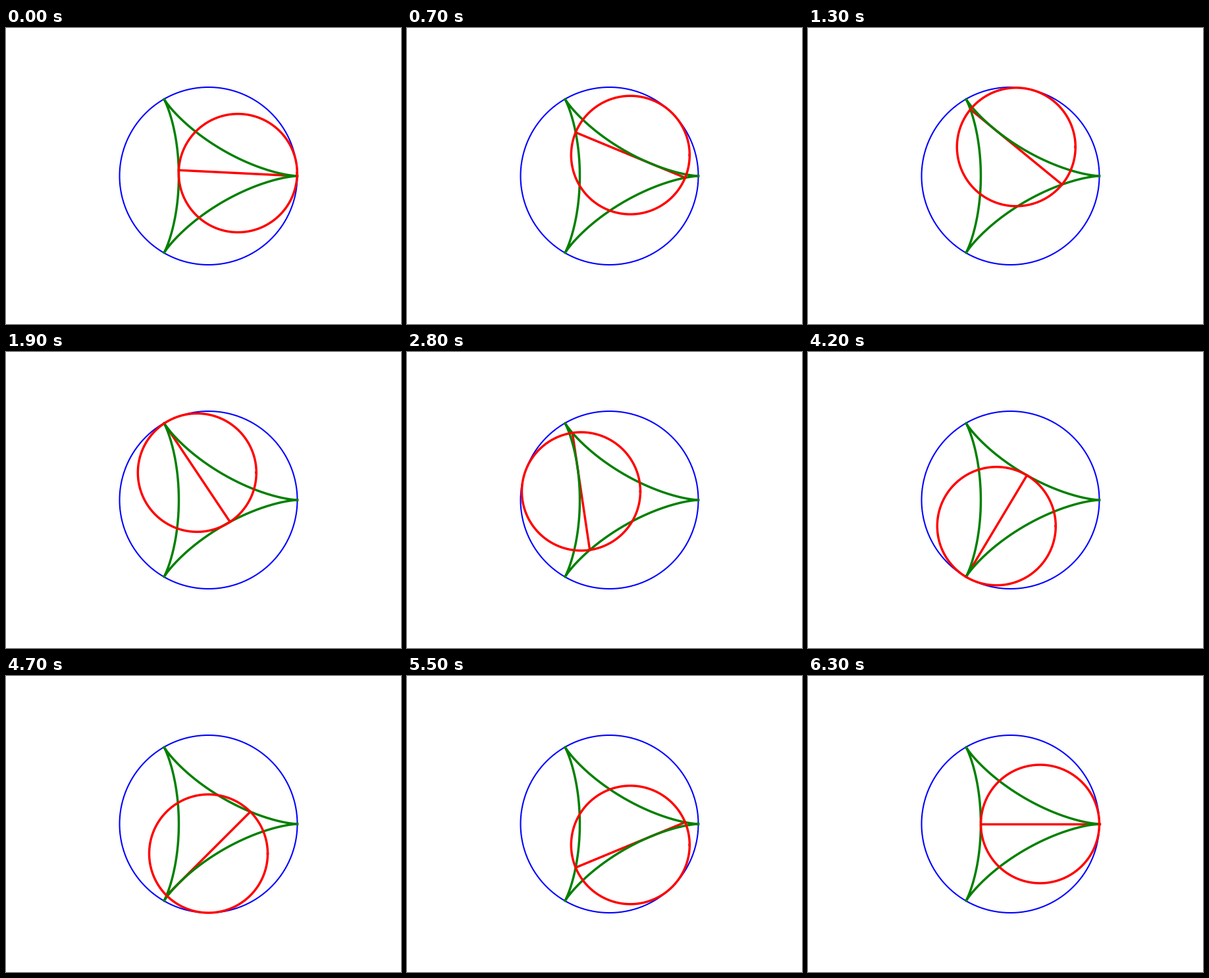
A matplotlib script for the animation above (6.4 s loop, 600 px wide and 450 px high).

```python
import numpy as np
import matplotlib.pyplot as plt
from matplotlib.animation import FuncAnimation

FRAMES = 64
INTERVAL = 100
WIDTH = 2.5

fig = plt.figure(figsize=(6, 4.5), dpi=100, facecolor="white")
ax = fig.add_axes([0.125, 0.1, 0.775, 0.8])
ax.set_xlim(-465 / 90, 465 / 90)
ax.set_ylim(-4, 4)
ax.axis("off")

u = np.linspace(0, 2 * np.pi, 401)
cos, sin = np.cos(u), np.sin(u)

# Fixed outer circle, sliding chord, deltoid, rolling circle
ax.plot(3 * cos, 3 * sin, color="blue", lw=1.5)
chord, = ax.plot([], [], color="red", lw=WIDTH)
ax.plot(2 * cos + np.cos(2 * u), 2 * sin - np.sin(2 * u),
        color="green", lw=WIDTH)
roller, = ax.plot([], [], color="red", lw=WIDTH)


def update(i):
    t = 2 * np.pi * (i + 1) / FRAMES
    cx, cy = np.cos(t), np.sin(t)
    roller.set_data(cx + 2 * cos, cy + 2 * sin)
    # The chord is a diameter turning backwards at half speed
    dx, dy = 2 * np.cos(t / 2), -2 * np.sin(t / 2)
    chord.set_data([cx - dx, cx + dx], [cy - dy, cy + dy])
    return chord, roller


anim = FuncAnimation(fig, update, frames=FRAMES, interval=INTERVAL,
                     repeat=True, repeat_delay=0, blit=False)
plt.show()
```
